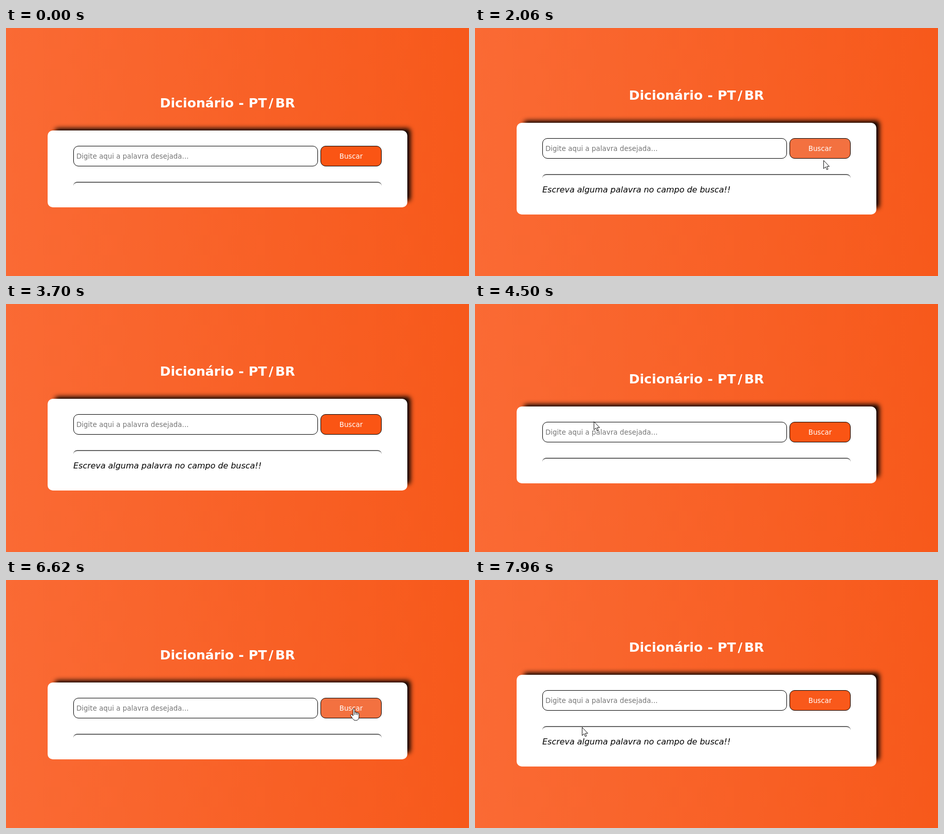
An HTML page for the animation above (8 s loop, 901 by 484 pixels).

```html
<!DOCTYPE html>
<html lang="pt-BR">
<head>
<meta charset="utf-8">
<title>Dicionário</title>
<style>
  html, body { margin: 0; width: 100%; height: 100%; overflow: hidden; }
  body {
    position: relative;
    background: linear-gradient(to right, #fa6a34, #f7591b);
    font: 13.333px "DejaVu Sans", sans-serif;
  }
  #app, #app > *, svg { position: absolute; box-sizing: border-box; white-space: pre; }
  #app { left: 0; top: 0; width: 901px; height: 484px; }
  #app.open { top: -15px; }
  h1 {
    left: 81px; top: 132px; width: 700px; margin: 0;
    font-size: 25.2px; line-height: 29px; text-align: center; color: #fff;
  }
  .dash { margin: 0 .015em; }
  .slash { margin: 0 .14em; }
  .card {
    left: 81px; top: 200px; width: 700px; height: 150px;
    background: #fff; border-radius: 10px; box-shadow: 10px -8px 10px -4px #000;
  }
  .open .card { height: 179px; }
  .field, .button {
    top: 230px; height: 40px; line-height: 40px;
    border: 1px solid #000; border-radius: 10px;
  }
  .field { left: 131px; width: 476px; padding-left: 5px; color: #757575; letter-spacing: .06px; }
  .button { left: 612px; width: 119px; color: #fff; text-align: center; }
  .rule {
    left: 131px; top: 300px; width: 600px; height: 20px;
    border-top: 2px solid #666; border-radius: 8px;
  }
  .hint {
    left: 131px; top: 321px; display: none; color: #000;
    font-size: 16px; line-height: 19px; font-style: italic; letter-spacing: -.03px;
  }
  .open .hint { display: block; }
  svg { left: 0; top: 0; width: 18px; height: 24px; overflow: visible; }
  svg path { fill: #fff; stroke: #111; stroke-linejoin: round; }
</style>
</head>
<body>
<div id="app">
  <h1>Dicionário <span class="dash">-</span> PT<span class="slash">/</span>BR</h1>
  <div class="card"></div>
  <div class="field">Digite aqui a palavra desejada...</div>
  <div class="button">Buscar</div>
  <div class="rule"></div>
  <div class="hint">Escreva alguma palavra no campo de busca!!</div>
</div>
<svg id="arrow"><path d="M.5 .5V16.5L4.2 13L6.6 18.5L9 17.5L6.7 12.2H11.5Z"/></svg>
<svg id="hand">
  <path d="M5.5 14V2Q5.5 .5 7 .5T8.5 2V7.5Q8.5 6.5 10 6.5T11.5 8Q11.5 7 13 7.2T14.3 9Q14.5 8.2 15.8 8.5T17 10.5V15Q17 23.2 10.5 23.2Q6.5 23.2 4.5 19.5L.8 14Q0 12 1.5 11.5T4 12.5Z"/>
  <path d="M8.5 7V12M11.5 8V12M14.3 9V12.5"/>
</svg>
<script>
const LOOP = 8000, HOP = 78;
const BASE = [250, 85, 20], HOVER = [243, 113, 64];
const ENTRY = [810, 468];

// Each move continues from the end of the one before; via bends it.
const MOVES = [
  { from: 130, until: 360, to: [729, 400] },
  { from: 1140, until: 1680, to: [678, 258] },
  { from: 2290, until: 2680, to: [695, 390] },
  { from: 3540, until: 3700, to: [231, 229] },
  { from: 4800, until: 5260, to: [697, 257], via: [360, 100] },
  { from: 5720, until: 6200, to: [623, 232] },
  { from: 6370, until: 6770, to: [685, 244], via: [664, 268] },
  { from: 7650, until: 7960, to: [208, 287] }
];

const $ = s => document.querySelector(s);
const app = $("#app"), button = $(".button"), arrow = $("#arrow"), hand = $("#hand");
const clamp = v => Math.max(0, Math.min(1, v));
const easeOut = u => 1 - (1 - u) ** 1.5;
const mix = (a, b, u) => a.map((v, i) => v + (b[i] - v) * u);

// The pointer is sampled in even hops, the first one at the start of a move.
function pointer(t) {
  let pos = ENTRY;
  for (const { from, until, to, via } of MOVES) {
    if (t < from) break;
    const hops = Math.round((until - from) / HOP);
    const done = Math.floor((t - from) / (until - from) * hops + .01);
    const u = easeOut(clamp((done + 1) / (hops + 1)));
    const mid = via || mix(pos, to, .5);
    pos = mix(mix(pos, mid, u), mix(mid, to, u), u);
  }
  return pos.map(Math.round);
}

const isOpen = t => (t >= 2060 && t < 4500) || t >= 7090;
const glow = (t, on, off) => clamp(Math.min((t - on) / 150, 1 - (t - off) / 460));

function place(el, shown, x, y) {
  el.style.display = shown ? "block" : "none";
  el.style.transform = `translate(${x}px, ${y}px)`;
}

function draw(t) {
  const open = isOpen(t);
  const heat = Math.max(glow(t, 1680, 2220), glow(t, 5100, 7570));
  const [x, y] = pointer(t);
  const top = open ? 215 : 230;
  const inRow = y >= top && y < top + 40;
  const onButton = inRow && x >= 612 && x < 731;
  const onField = inRow && x >= 131 && x < 607;
  const visible = t >= MOVES[0].from && !onField;

  app.classList.toggle("open", open);
  button.style.background = `rgb(${mix(BASE, HOVER, heat).map(Math.round)})`;
  place(arrow, visible && !onButton, x, y);
  place(hand, visible && onButton, x - 6, y);
}

const start = performance.now();
function tick() {
  draw((performance.now() - start) % LOOP);
  requestAnimationFrame(tick);
}
tick();
</script>
</body>
</html>
```
